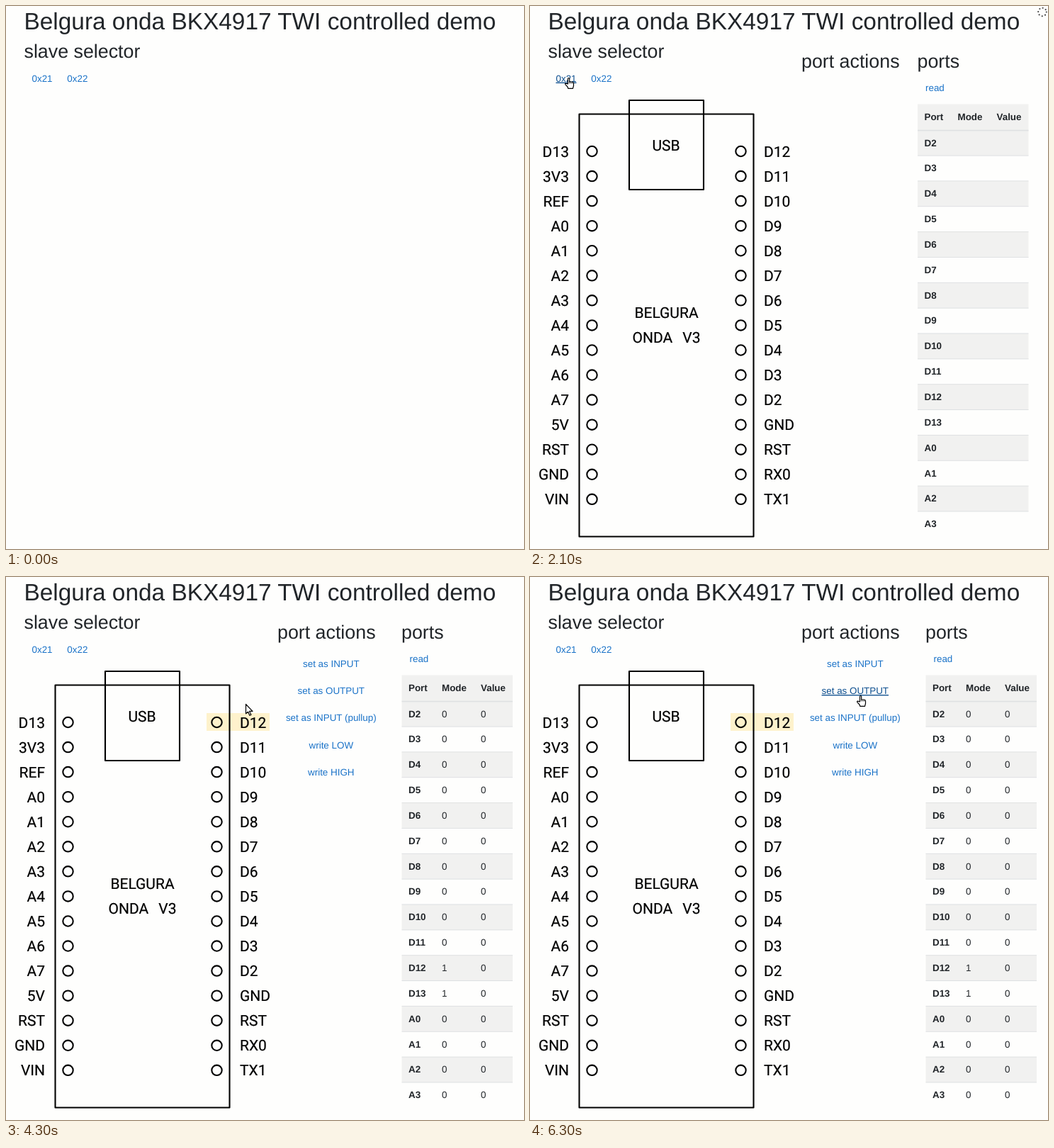
An HTML page that plays this animation: 731 px wide and 766 px high, repeating every 8 s.

```html
<!DOCTYPE html>
<html lang="en">
<head>
<meta charset="utf-8">
<title>TWI demo</title>
<style>
html, body { margin: 0; width: 100%; height: 100%; overflow: hidden; background: #fefefd; }
svg { display: block; }
text { font: 13.4px "Liberation Sans", Arial, sans-serif; fill: #212529; text-rendering: geometricPrecision; }
.h1 { font-size: 33.4px; }
.h2 { font-size: 26.8px; }
.b { font-weight: bold; }
.link { fill: #1b73c8; }
.focus { text-decoration: underline; }
.hover { fill: #0d4f8f; text-decoration: underline; }
.mid { text-anchor: middle; }
.end { text-anchor: end; }
.pin { font: 21px Roboto, sans-serif; fill: #000; stroke: #000; stroke-width: .2; word-spacing: 9px; }
.line { fill: none; stroke: #000; stroke-width: 2.1; stroke-linejoin: round; }
.cursor { fill: #fff; stroke: #000; stroke-width: 1.2; stroke-linejoin: round; }
.spinner { fill: none; stroke: #444; stroke-width: 2.2; stroke-linecap: round; stroke-dasharray: 0 4.555; }
</style>
</head>
<body>
<svg id="stage" width="731" height="766" viewBox="0 0 731 766"></svg>
<script>
const LOOP = 8000, STEP = 100;
const LOADED = 2100, FILLED = 2200, PICKED = 3800, ACTIONS = 4300;

// pointer path: time, x, y of the tip
const path = [
  [600, 511, 64], [1300, 98, 88], [1400, 66, 88], [1600, 54, 101], [2500, 54, 101],
  [2800, 251, 148], [2900, 251, 148], [3600, 312, 187], [3700, 312, 187],
  [3900, 340, 198], [4200, 340, 198], [4300, 338, 179], [4900, 495, 155],
  [5000, 495, 155], [5200, 457, 163], [5300, 464, 165], [5600, 464, 165],
  [5800, 467, 167], [6200, 467, 167], [6300, 466, 167], [LOOP, 466, 167]
];
const left = 'D13 3V3 REF A0 A1 A2 A3 A4 A5 A6 A7 5V RST GND VIN'.split(' ');
const right = 'D12 D11 D10 D9 D8 D7 D6 D5 D4 D3 D2 GND RST RX0 TX1'.split(' ');
const ports = 'D2 D3 D4 D5 D6 D7 D8 D9 D10 D11 D12 D13 A0 A1 A2 A3'.split(' ');
const actions = ['set as INPUT', 'set as OUTPUT', 'set as INPUT (pullup)', 'write LOW', 'write HIGH'];

const text = (x, y, s, cls = '') => `<text x="${x}" y="${y}" class="${cls}">${s}</text>`;
const rect = (x, y, w, h, attrs) => `<rect x="${x}" y="${y}" width="${w}" height="${h}" ${attrs}/>`;

function pointerAt(t) {
  const i = path.findIndex(p => p[0] > t);
  if (i < 1) return null;
  const [t0, x0, y0] = path[i - 1], [t1, x1, y1] = path[i];
  const k = (t - t0) / (t1 - t0);
  return { x: x0 + (x1 - x0) * k, y: y0 + (y1 - y0) * k };
}

function hovered(p, t) {
  if (!p) return '';
  const inside = (x0, y0, x1, y1) => p.x >= x0 && p.x < x1 && p.y >= y0 && p.y < y1;
  if (inside(26, 86, 76, 115)) return '0x21';
  if (inside(76, 86, 126, 115)) return '0x22';
  if (t >= LOADED && inside(283, 192, 372, 217)) return 'D12';
  if (t >= ACTIONS && inside(384, 141, 533, 179)) return 'set as OUTPUT';
  return '';
}

function board() {
  let s = rect(69.5, 152.5, 246, 596, 'class="line"') + rect(140, 133, 105, 126, 'class="line"');
  s += text(192, 203.5, 'USB', 'pin mid') + text(192.5, 440, 'BELGURA', 'pin mid') + text(192.5, 475, 'ONDA V3', 'pin mid');
  left.forEach((name, i) => {
    const y = 205 + 35.06 * i;
    s += text(55, y + 7.5, name, 'pin end') + text(330, y + 7.5, right[i], 'pin');
    for (const x of [87.5, 297.5]) s += `<circle cx="${x}" cy="${y}" r="7.2" class="line"/>`;
  });
  return s;
}

function table(filled) {
  const pitch = 35.85, top = 175.3;
  let s = text(546.5, 87, 'ports', 'h2') + text(558, 120.3, 'read', 'link');
  s += rect(547, 138.5, 156.5, 36.5, 'fill="#f1f1f0"');
  s += text(556.5, 161, 'Port', 'b') + text(603.5, 161, 'Mode', 'b') + text(658.5, 161, 'Value', 'b');
  ports.forEach((name, i) => {
    const y = top + pitch * i;
    if (i % 2 == 0) s += rect(547, y, 156.5, pitch, 'fill="#f1f1f0"');
    s += rect(547, y - .6, 156.5, i ? 1 : 1.7, 'fill="#dee0e2"');
    s += text(556.5, y + 22.2, name, 'b');
    if (filled) s += text(603.5, y + 22.2, /D1[23]/.test(name) ? 1 : 0) + text(658.5, y + 22.2, 0);
  });
  return s;
}

function pointer({ x, y }, hand) {
  const shape = hand
    ? `<g transform="translate(${x - 5} ${y})"><path d="M4.5 9V1.6a1.1 1.1 0 0 1 2.2 0V6H10.5q2 .2 2 2v3.5l-1 3.8H4.8L4 13 .8 9.6q-.6-1.2.7-1.5z"/><path d="M6.7 6V8.5M8.8 6.3V8.5M10.8 6.6V8.5" stroke-width=".8"/></g>`
    : `<path transform="translate(${x} ${y})" d="M.5.5V13.8l3-2.7 2.3 5.2 2.1-.9-2.3-5H10z"/>`;
  return `<g class="cursor">${shape}</g>`;
}

function scene(t) {
  const p = pointerAt(t), over = hovered(p, t);
  const link = (x, y, s, cls = '') => text(x, y, s, `link ${cls} ${over == s ? 'hover' : ''}`);
  const focus = t >= LOADED && t < PICKED ? 'focus' : '';
  let s = text(25.5, 33, 'Belgura onda BKX4917 TWI controlled demo', 'h1');
  s += text(25.5, 73.3, 'slave selector', 'h2');
  s += link(36.5, 106.7, '0x21', focus) + link(86.3, 106.7, '0x22');
  if (t >= LOADED) {
    if (t >= PICKED) s += rect(283, 192, 89, 25, `fill="#ffc107" opacity="${over == 'D12' ? .3 : .2}"`);
    s += board() + text(383, 87, 'port actions', 'h2');
    s += `<g transform="translate(${t >= ACTIONS ? 11.5 : 0} 0)">${table(t >= FILLED)}</g>`;
    if (t < FILLED) s += '<circle cx="723" cy="8.5" r="5.8" class="spinner"/>';
  }
  if (t >= ACTIONS) actions.forEach((a, i) => s += link(458.8, 126.7 + 38.35 * i, a, 'mid'));
  return p ? s + pointer(p, over) : s;
}

const stage = document.getElementById('stage');
const start = performance.now();
let shown = -1;
function draw() {
  const t = Math.floor((performance.now() - start) % LOOP / STEP) * STEP;
  if (t != shown) stage.innerHTML = scene(shown = t);
  requestAnimationFrame(draw);
}
draw();
</script>
</body>
</html>
```
